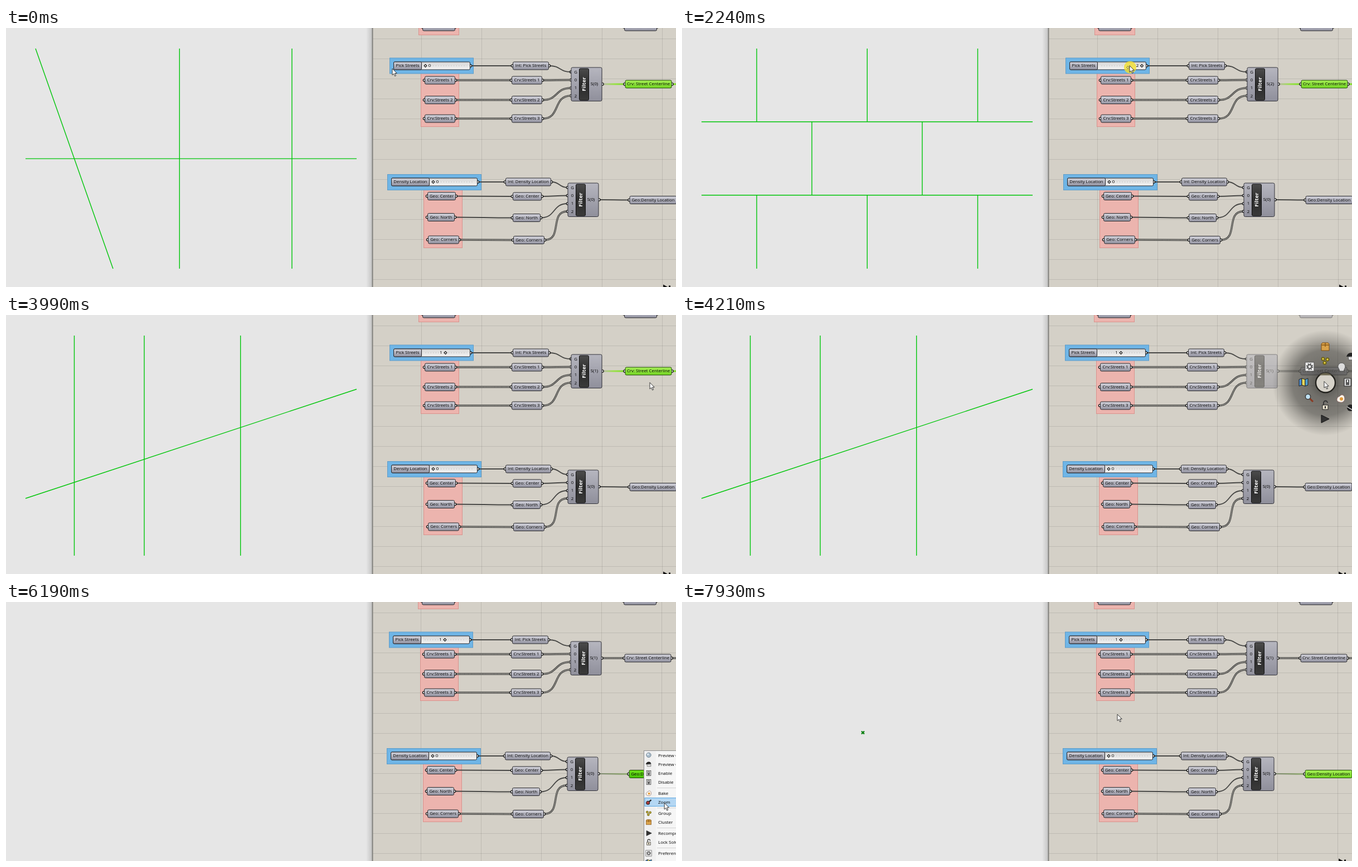
Animation of 1202x466 px, one loop 8000 ms. Source, as an HTML page:

```html
<!DOCTYPE html>
<html lang="en">
<head>
<meta charset="utf-8">
<title>Street and density sliders</title>
<style>
  html, body { margin: 0; width: 100%; height: 100%; overflow: hidden; background: #e6e6e6; }
  svg { display: block; }
  text { font-family: "Open Sans", "Noto Sans", sans-serif; font-size: 7.8px; fill: #000; }
</style>
</head>
<body>
<svg id="stage" width="1202" height="466" viewBox="0 0 1202 466">
  <defs>
    <linearGradient id="grey" x2="0" y2="1"><stop stop-color="#d2d2da"/><stop offset="1" stop-color="#9292a0"/></linearGradient>
    <linearGradient id="body" x2="0" y2="1"><stop stop-color="#b6b6bf"/><stop offset="1" stop-color="#8f8f9b"/></linearGradient>
    <linearGradient id="lime" x2="0" y2="1"><stop stop-color="#a6ee56"/><stop offset="1" stop-color="#74d622"/></linearGradient>
    <linearGradient id="green" x2="0" y2="1"><stop stop-color="#6fe01c"/><stop offset="1" stop-color="#45bf06"/></linearGradient>
    <linearGradient id="track" x2="0" y2="1"><stop stop-color="#d6d6d6"/><stop offset="1" stop-color="#f4f4f4"/></linearGradient>
    <linearGradient id="bar" x2="0" y2="1"><stop stop-color="#4c4c4c"/><stop offset=".5" stop-color="#2b2b2b"/><stop offset="1" stop-color="#3a3a3a"/></linearGradient>
    <linearGradient id="edge"><stop stop-color="#000" stop-opacity="0"/><stop offset="1" stop-color="#000" stop-opacity=".15"/></linearGradient>
    <linearGradient id="limeWire" gradientUnits="userSpaceOnUse" x1="1070" x2="1110"><stop stop-color="#b9b9a8"/><stop offset=".5" stop-color="#9be04a"/><stop offset="1" stop-color="#80dc28"/></linearGradient>
    <linearGradient id="dimWire" gradientUnits="userSpaceOnUse" x1="1064" x2="1118"><stop stop-color="#7f8872"/><stop offset="1" stop-color="#a0c474"/></linearGradient>
    <radialGradient id="haze" gradientUnits="userSpaceOnUse" cx="1154" cy="122" r="95">
      <stop offset=".19" stop-color="#1c1c1a" stop-opacity=".62"/><stop offset=".3" stop-color="#1c1c1a" stop-opacity=".54"/>
      <stop offset=".62" stop-color="#1c1c1a" stop-opacity=".46"/><stop offset=".82" stop-color="#1c1c1a" stop-opacity=".2"/>
      <stop offset="1" stop-color="#1c1c1a" stop-opacity="0"/>
    </radialGradient>
    <clipPath id="right"><rect x="658" width="544" height="466"/></clipPath>
  </defs>
</svg>
<script>
const stage = document.getElementById("stage");

function el(parent, tag, attrs = {}, text) {
  const node = document.createElementNS("http://www.w3.org/2000/svg", tag);
  for (const k in attrs) node.setAttribute(k, attrs[k]);
  if (text !== undefined) node.textContent = text;
  return parent.appendChild(node);
}
const group = (parent, attrs) => el(parent, "g", attrs);
const path = (parent, d, attrs) => el(parent, "path", { d, fill: "none", ...attrs });
const rect = (parent, x, y, width, height, attrs) => el(parent, "rect", { x, y, width, height, ...attrs });
const dot = (parent, cx, cy, r, attrs) => el(parent, "circle", { cx, cy, r, ...attrs });
const label = (parent, x, y, text, attrs) =>
  el(parent, "text", { x, y: y + 2.6, "text-anchor": "middle", ...attrs }, text);
const show = (node, on) => node.setAttribute("display", on ? "inline" : "none");

// Street layouts
const layouts = [
  "M53 37L192 433M35 235.1H629M311.3 37V433M513 37V433",
  "M122.5 37V433M248 37V433M420.7 37V433M35 330L629 133.5",
  "M35 168.8H629M35 300.8H629" +
    [134, 332.3, 530.5].map(x => `M${x} 37V169M${x} 301V433`).join("") +
    [233, 431].map(x => `M${x} 169V301`).join("")
];
const streets = path(stage, layouts[0], { stroke: "#00c60a", "stroke-width": 1.4 });
const mark = path(stage, "M322 232.5l5 5m0 -5l-5 5", { stroke: "#007d08", "stroke-width": 2.2 });

// Canvas background
rect(stage, 646, 0, 11, 466, { fill: "url(#edge)" });
const panel = group(stage, { "clip-path": "url(#right)" });
rect(panel, 657, 0, 545, 466, { fill: "#d4d0c7" });
const canvas = group(panel);
let grid = "";
for (let x = 745.5; x < 1202; x += 108) grid += `M${x} 0V466`;
for (let i = 0; i < 13; i++) grid += `M650 ${19 + Math.round(36.1 * i) + .5}H1210`;
path(canvas, grid, { stroke: "#000", "stroke-opacity": .1 });

// Coloured groups
const pink = { fill: "#ecb4ae", stroke: "#d9938d" }, blue = { fill: "#6fb5e6", stroke: "#5c9cc9" };
rect(canvas, 740.5, -8.5, 72, 21, pink);
rect(canvas, 744.5, 80.5, 68, 97, pink);
rect(canvas, 749.5, 289.5, 69, 106, pink);
rect(canvas, 688.5, 54, 150, 28, blue);
rect(canvas, 684.5, 263.5, 168, 28, blue);

// Wires
function wire(parent, x0, y0, x1, y1, double) {
  const d = Math.hypot(x1 - x0, y1 - y0) / 2;
  const g = group(parent);
  const c = `M${x0} ${y0}C${x0 + d} ${y0} ${x1 - d} ${y1} ${x1} ${y1}`;
  path(g, c, { stroke: "#484846", "stroke-width": double ? 3.4 : 1.9 });
  if (double) path(g, c, { stroke: "#b5b2ab", "stroke-width": 1 });
  return g;
}
const near = group(canvas);

function nub(parent, x, y) {
  dot(parent, x, y, 2.1, { fill: "#fff", stroke: "#111", "stroke-width": 1.3 });
}
function param(parent, x, w, y, text) {
  nub(parent, x - 1, y);
  nub(parent, x + w + 1, y);
  const box = rect(parent, x, y - 7, w, 14, { rx: 2.2, fill: "url(#grey)", stroke: "#26262a" });
  label(parent, x + w / 2, y - .5, text);
  return box;
}
function paint(box, fill) {
  box.setAttribute("fill", `url(#${fill})`);
  box.setAttribute("stroke", fill === "grey" ? "#26262a" : "#1f4a08");
}
function filter(parent, x, y) {
  [8, 22.5, 37, 51].forEach(dy => nub(parent, x - .5, y + dy));
  nub(parent, x + 56, y + 30);
  rect(parent, x, y, 55, 60.5, { rx: 2.5, fill: "url(#body)", stroke: "#33333a" });
  rect(parent, x + 14.5, y + 2, 17, 57, { rx: 2, fill: "url(#bar)", stroke: "#111" });
  label(parent, 0, 1, "Filter", {
    transform: `translate(${x + 22.7} ${y + 30})rotate(-90)`,
    style: "font-size:9.6px;font-weight:700;fill:#fff"
  });
  ["G", "0", "1", "2"].forEach((s, i) => label(parent, x + 8, y + 8 + 14.4 * i, s));
  return label(parent, x + 41.5, y + 29.5, "S(0)");
}
const diamond = (parent, attrs) =>
  path(parent, "M-2.4 0L0 -2.4L2.4 0L0 2.4Z", { fill: "#fff", stroke: "#111", "stroke-width": 1.1, ...attrs });
function slider(x, mid, end, y, text) {
  nub(canvas, end + 1, y);
  rect(canvas, x, y - 7, end - x, 14, { rx: 2, fill: "url(#track)", stroke: "#26262a" });
  rect(canvas, x, y - 7, mid - x, 14, { rx: 2, fill: "url(#grey)", stroke: "#26262a" });
  label(canvas, (x + mid) / 2, y - .5, text);
  path(canvas, `M${mid + 7} ${y}H${end - 6}`, { stroke: "#c6c6c6", "stroke-width": 2, "stroke-dasharray": "1 3.6" });
  return { knob: diamond(canvas, { transform: `translate(${mid + 7} ${y})` }), value: label(canvas, mid + 14.5, y - .5, "0") };
}

wire(canvas, 834, 68, 908, 68);
wire(canvas, 975, 68, 1013, 79);
[[94, 93.5], [129.5, 108], [163, 122]].forEach(([y, to], i) => {
  wire(canvas, 807, y, 906, y, true);
  wire(canvas, 963, y, 1013, to, true);
  param(canvas, 751.5, 54, y, "Crv:Streets " + (i + 1));
  param(canvas, 907.5, 54, y, "Crv:Streets " + (i + 1));
});
param(canvas, 909.5, 64, 68, "Int: Pick Streets");
const pick = slider(695.5, 745.5, 832.5, 68, "Pick Streets");

wire(canvas, 847, 277, 895, 277);
wire(canvas, 979, 277, 1007, 287);
[["Center", 756.5, 50, 302.5, 909.5, 51, 303, 301.5],
 ["North", 756.5, 48, 340.5, 909.5, 49, 341.5, 316],
 ["Corners", 757.5, 55, 381, 910.5, 55, 381.5, 330]].forEach(([name, x, w, y, x2, w2, y2, to], i) => {
  wire(canvas, x + w + 1, y, x2 - 1, y2, i > 1);
  wire(canvas, x2 + w2 + 1, y2, 1007, to, i > 1);
  param(canvas, x, w, y, "Geo: " + name);
  param(canvas, x2, w2, y2, "Geo: " + name);
});
param(canvas, 896.5, 81, 277, "Int: Density Location");
slider(691.5, 759.5, 845.5, 277, "Density Location");

param(canvas, 747.5, 58, -2, "");
param(near, 1109.5, 58, -2, "");

const greyWire = wire(near, 1071, 101, 1110, 101, true);
const greyTail = wire(near, 1196, 101, 1210, 101, true);
const limeWire = path(near, "M1071 101H1110M1196 101H1210", { stroke: "url(#limeWire)", "stroke-width": 3 });
const output = filter(near, 1014, 71);
const crvBox = param(near, 1111, 83, 101, "Crv: Street Centerline");

wire(canvas, 1065, 309, 1117, 309.5);
const geoWire = path(canvas, "M1065 309C1090 309 1092 309.5 1117 309.5", { stroke: "url(#dimWire)", "stroke-width": 2.2 });
filter(canvas, 1008, 279);
const geoBox = param(canvas, 1119, 84, 309.5, "Geo:Density Location");
path(canvas, "M1179 461.5L1187 466H1179ZM1189 463.5h3v3h-3Z", { fill: "#111" });

rect(stage, 656.5, 0, 2, 466, { fill: "#82817d" });

// Icons, drawn around 0,0 about 16 px wide
const ink = { stroke: "#222", "stroke-width": 1 };
const icons = {
  box(g) {
    path(g, "M-7 -5L-5 -7H5L7 -5V7H-7Z", { fill: "#d9a24a", stroke: "#7a4d12" });
    path(g, "M-7 -3H7M0 -7V0", { stroke: "#8a5a18", "stroke-width": 1.5 });
  },
  trefoil(g) {
    [[-4, -3], [4, -2], [-1, 4]].forEach(([x, y]) => dot(g, x, y, 2.6, { fill: "#e8d64a", stroke: "#6d6110", "stroke-width": 1.8 }));
  },
  gear(g) {
    rect(g, -8, -8, 16, 16, { fill: "#eee", stroke: "#555" });
    dot(g, 0, 0, 3.4, { fill: "none", stroke: "#555", "stroke-width": 2 });
    dot(g, 0, 0, 5.2, { fill: "none", stroke: "#555", "stroke-width": 2, "stroke-dasharray": "2 2.1" });
  },
  map(g) {
    path(g, "M-8 -5L-3 -7V5L-8 7Z", { fill: "#4a8fd8", ...ink });
    path(g, "M-3 -7L3 -5V7L-3 5Z", { fill: "#e6d65a", ...ink });
    path(g, "M3 -5L8 -7V5L3 7Z", { fill: "#4f9fd0", ...ink });
  },
  lens(g) {
    path(g, "M1 1L7 7", { stroke: "#8a3a22", "stroke-width": 3 });
    dot(g, -2, -2, 4.6, { fill: "#bfe0f2", stroke: "#333", "stroke-width": 1.4 });
  },
  zoom(g) {
    path(g, "M1 -1L7 -6", { stroke: "#222", "stroke-width": 3.4 });
    dot(g, -2, 2, 4.6, { fill: "#b03a3a", stroke: "#222", "stroke-width": 1.6 });
  },
  lock(g) {
    path(g, "M-3 0V-4A3.4 3.4 0 0 1 4 -4", { stroke: "#333", "stroke-width": 1.8 });
    rect(g, -5, 0, 10, 8, { fill: "#e9e2cf", ...ink });
    rect(g, -1, 2, 2, 4, { fill: "#222" });
  },
  play: g => path(g, "M-6 -7L8 0L-6 7Z", { fill: "#333", stroke: "#111" }),
  head(g) {
    path(g, "M-6 0A6.5 6.5 0 1 1 6 2L4 7H-3L-4 4Z", { fill: "#dcdcdc", stroke: "#555" });
  },
  ball(g) {
    dot(g, 0, -1, 6.5, { fill: "#a9bccb", stroke: "#4f6475" });
    dot(g, -2, -3, 2.4, { fill: "#e8f1f7" });
  },
  hat(g) {
    path(g, "M-5 0H6V6H-4Z", { fill: "#e0e0e0", stroke: "#555" });
    path(g, "M-8 0Q-6 -7 0 -7T7 -1Z", { fill: "#222" });
  },
  toggle(g) {
    rect(g, -6, -7, 12, 14, { fill: "#ddd", ...ink });
    rect(g, -3, -5, 6, 10, { fill: "#555" });
    rect(g, -1, -4, 2, 4, { fill: "#fff" });
  },
  egg(g) {
    path(g, "M-7 4Q-8 -2 -2 -4Q2 -9 6 -4Q9 4 3 7Q-4 8 -7 4Z", { fill: "#fbf6ea", stroke: "#866" });
    dot(g, 1, 1, 3, { fill: "#e39a3c" });
  },
  bomb(g) {
    dot(g, 0, 0, 6, { fill: "#222" });
    path(g, "M-6 -2L4 4", { stroke: "#ddd", "stroke-width": 1.4 });
  }
};
const icon = (parent, name, x, y, size = 1) =>
  icons[name](group(parent, { transform: `translate(${x} ${y})scale(${size})` }));

// Radial menu
const radial = group(stage);
dot(radial, 1154, 122, 95, { fill: "url(#haze)" });
dot(radial, 1154.5, 122, 17.5, { fill: "#d6d2c9", stroke: "#24231f", "stroke-width": 2.4 });
path(radial, "M1143 108.5A17.5 17.5 0 0 1 1166 108.5Z", { fill: "#6b6650" });
[["box", 1154, 57], ["trefoil", 1154, 82], ["gear", 1126, 93], ["map", 1115, 121], ["lens", 1125, 149],
 ["lock", 1154, 162], ["play", 1153, 187], ["head", 1183, 94], ["hat", 1200, 75], ["toggle", 1194, 121],
 ["egg", 1182, 150], ["bomb", 1199, 167]].forEach(([n, x, y]) => icon(radial, n, x, y));

// Context menu
const menu = group(stage);
rect(menu, 1144.5, 267.5, 80, 220, { fill: "#f6f6f6", stroke: "#8f8f8f" });
rect(menu, 1145, 268, 21, 220, { fill: "#f0f0f0" });
const hover = rect(menu, 1146, 269, 80, 15, { fill: "#b4d7f3", stroke: "#5aa6e0" });
const rows = [["Preview On", "ball", 276], ["Preview Off", "hat", 292], ["Enable", "toggle", 308], ["Disable", "toggle", 324],
  ["Bake", "egg", 344], ["Zoom", "zoom", 360], ["Group", "trefoil", 380], ["Cluster", "box", 396],
  ["Recompute", "play", 416], ["Lock Solver", "lock", 432], ["Preferences", "gear", 452], ["Navigate", "map", 468]];
rows.forEach(([text, name, y]) => {
  icon(menu, name, 1153, y, .65);
  label(menu, 1170, y + .2, text, { "text-anchor": "start", style: "font-size:8px" });
});
path(menu, [334, 370, 406, 442].map(y => `M1168 ${y + .5}H1202`).join(""), { stroke: "#d2d2d2" });

// Pointer
const press = group(stage);
dot(press, 1, 3, 11, { fill: "#f2e02e", "fill-opacity": .8 });
const ghost = diamond(stage, { opacity: .35 });
const pointer = path(stage, "M0 0V11.6L2.7 9.2L4.6 13.6L6.5 12.8L4.6 8.5H8.3Z",
  { fill: "#fff", stroke: "#222", "stroke-width": .9, "stroke-linejoin": "round" });

// Pointer moves: start, end, steps, x, y
const moves = [
  [80, 370, 5, 752, 67.5], [650, 1090, 7, 789, 68], [1300, 1800, 7, 818, 67.5],
  [2100, 2540, 7, 783, 68], [2760, 2900, 3, 755, 68], [3270, 3420, 3, 786, 69],
  [3490, 3990, 8, 1155, 121.5], [4080, 4150, 2, 1152, 119.5], [4290, 4500, 4, 1183, 93],
  [4580, 4880, 5, 1168, 308], [4950, 5170, 4, 1144, 266], [5480, 6120, 9, 1180, 374],
  [6190, 6630, 7, 1188, 286], [6930, 7070, 3, 1187, 273], [7350, 7580, 4, 1184, 274],
  [7780, 7930, 3, 781, 202]
];
const picks = [[0, 0], [870, 1], [1580, 2], [2390, 1], [2830, 0], [3340, 1]];

function pointerAt(t) {
  let x = 693, y = 73;
  for (const [start, end, steps, tx, ty] of moves) {
    const age = t + 10 - start;
    if (age < 0) break;
    const k = Math.min(steps, Math.floor(age / (end - start) * (steps - 1)) + 1) / steps;
    x += (tx - x) * k;
    y += (ty - y) * k;
  }
  return [x, y];
}
const within = (t, a, b) => t >= a && t < b;

function render(t) {
  const [x, y] = pointerAt(t);
  const at = `translate(${x} ${y})`;
  pointer.setAttribute("transform", at);
  press.setAttribute("transform", at);

  const value = picks.filter(p => p[0] <= t).pop()[1];
  const knobX = [752.5, 788.5, 825][value];
  pick.knob.setAttribute("transform", `translate(${knobX} 68)`);
  pick.value.setAttribute("x", value ? knobX - 8 : knobX + 7.5);
  pick.value.textContent = value;
  output.textContent = `S(${value})`;
  streets.setAttribute("d", layouts[value]);

  const drag = within(t, 650, 1950) || within(t, 2100, 3490);
  show(press, drag);
  show(ghost, drag);
  ghost.setAttribute("transform", `translate(${x - 3} 71)`);

  const wheel = within(t, 4080, 4500), picked = t < 4880;
  const plain = wheel || !picked;
  canvas.setAttribute("transform", `translate(${t < 4080 ? 0 : -1} 0)`);
  near.setAttribute("opacity", wheel ? .5 : 1);
  show(radial, wheel);
  show(streets, t < 4500);
  show(limeWire, !plain);
  show(greyWire, plain);
  show(greyTail, plain);
  paint(crvBox, plain ? "grey" : t < 4500 ? "lime" : "green");

  const previewed = t >= 7420;
  show(geoWire, !picked);
  paint(geoBox, picked ? "grey" : previewed ? "lime" : "green");
  show(mark, previewed);

  const row = rows.find(r => Math.abs(y - r[2]) <= 8);
  show(menu, within(t, 5390, 7420));
  show(hover, row && x > 1145);
  if (row) hover.setAttribute("y", row[2] - 7.5);
}

function tick() {
  render(performance.now() % 8000);
  requestAnimationFrame(tick);
}
tick();
</script>
</body>
</html>
```
